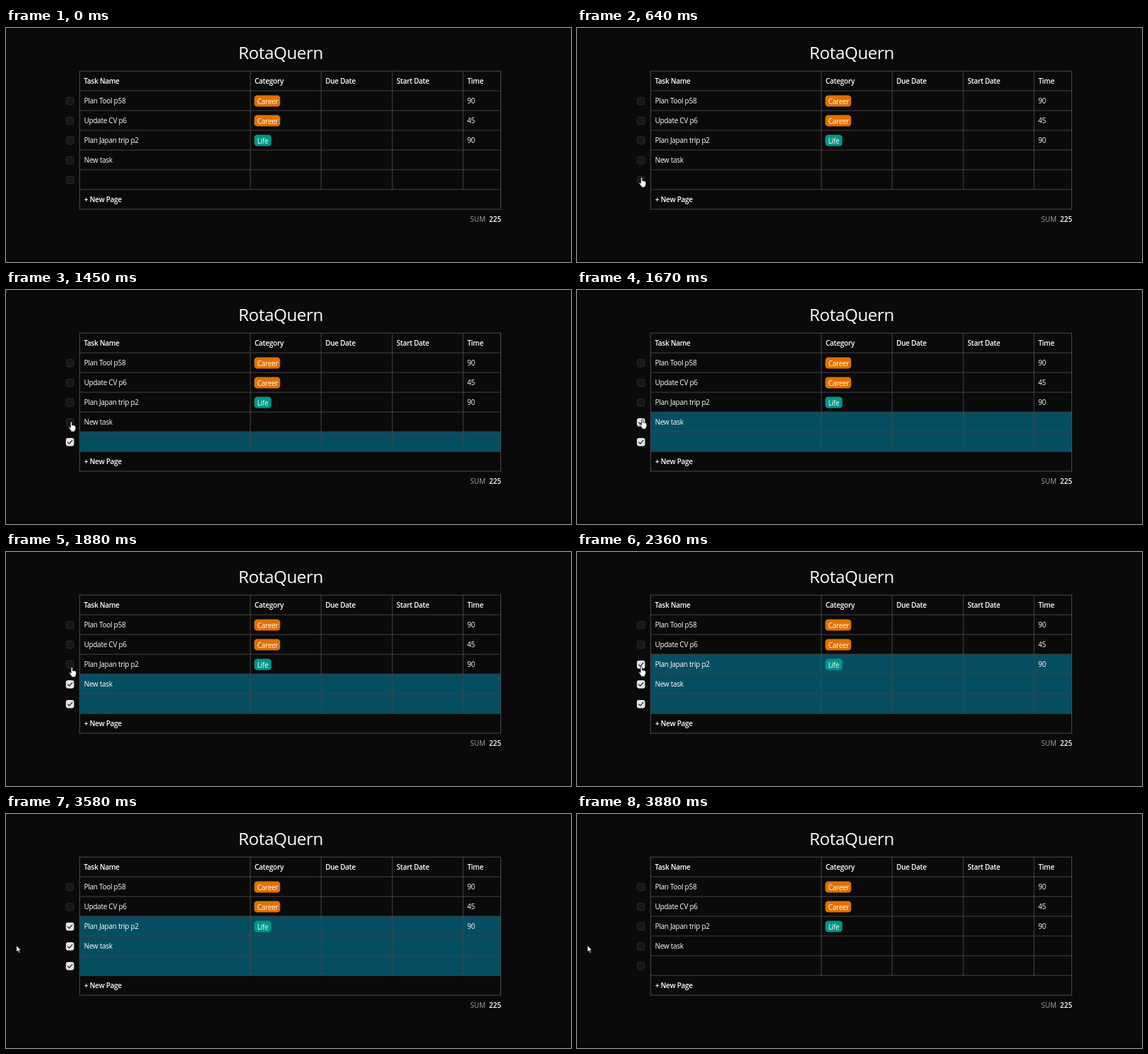
Animation of 800x332 px, one loop 3.97 s. Source, as an HTML page:

```html
<!DOCTYPE html>
<html lang="en">
<head>
<meta charset="utf-8">
<title>Task table</title>
<style>
  html, body { margin: 0; width: 100%; height: 100%; overflow: hidden; background: #0a0a0a; }
  svg { display: block; width: 800px; height: 332px; font: 10px "Open Sans", sans-serif; letter-spacing: -.27px; }
  text { fill: #fff; }
  .title { font-size: 24.2px; letter-spacing: -.4px; text-anchor: middle; }
  .bold { font-weight: 600; }
  .sum { font-weight: 600; letter-spacing: 0; }
  .muted { font-weight: 500; letter-spacing: 0; fill: #a0a0a0; }
</style>
</head>
<body>
<svg id="stage" viewBox="0 0 800 332"></svg>
<script>
const LOOP = 3970, FADE = 150, CLEAR = 3600;
const stage = document.getElementById("stage");
const COLS = [104.2, 346, 446.2, 547, 647.2, 700.5];
const HEADS = ["Task Name", "Category", "Due Date", "Start Date", "Time"];
const ROWS = [
  { name: "Plan Tool p58", tag: "Career", time: "90" },
  { name: "Update CV p6", tag: "Career", time: "45" },
  { name: "Plan Japan trip p2", tag: "Life", time: "90", check: 2000 },
  { name: "New task", check: 1490 },
  { name: "", check: 860 }
];
const TAGS = { Career: [36.7, "#e17100"], Life: [24.2, "#009689"] };

// time, x, y, easing into this point
const PATH = [
  [30, 30, 208, "linear"], [300, 92, 198, "out"], [450, 92, 198, "linear"],
  [640, 91.5, 212, "inOut"], [900, 91.5, 212, "linear"], [1180, 92.5, 187, "inOut"],
  [1600, 92.5, 187, "linear"], [1880, 93.3, 163.5, "inOut"], [2250, 93, 163, "linear"],
  [2520, 82, 162, "in"], [2640, 53.7, 162, "linear"], [3060, 14.8, 186.5, "out"]
];
const EASE = {
  linear: p => p,
  in: p => p * p,
  out: p => 1 - (1 - p) ** 2,
  inOut: p => p * p * (3 - 2 * p)
};

function add(tag, attrs, parent = stage) {
  const el = document.createElementNS("http://www.w3.org/2000/svg", tag);
  for (const key in attrs) el.setAttribute(key, attrs[key]);
  return parent.appendChild(el);
}
function label(text, x, y, cls = "") {
  add("text", { x, y, class: cls }).textContent = text;
}
function rect(x, y, width, height, fill, more = {}, parent = stage) {
  return add("rect", { x, y, width, height, fill, ...more }, parent);
}
const rowTop = i => 89.1 + 28 * i;

rect(0, 0, 800, 1, "#050505");
rect(0, 328, 800, 4, "#060606");
label("RotaQuern", 389, 44.3, "title");

ROWS.forEach((row, i) => {
  row.fill = rect(104.2, rowTop(i), 596.3, 28, "#054e62", { opacity: 0 });
});

let grid = "";
for (let i = 0; i < 6; i++) grid += `M104.2 ${rowTop(i)}H700.5`;
COLS.slice(1, -1).forEach(x => grid += `M${x} 61.1V229.1`);
add("path", { d: grid, stroke: "#444", fill: "none" });
rect(104.2, 61.1, 596.3, 196, "none", { stroke: "#4c4c4c" });

HEADS.forEach((head, i) => label(head, COLS[i] + 6, 79.4, "bold"));
ROWS.forEach((row, i) => {
  const y = rowTop(i);
  label(row.name, 110.4, y + 18.3);
  if (row.tag) {
    const [width, color] = TAGS[row.tag];
    rect(351.5, y + 6.5, width, 16, color, { rx: 4.2 });
    label(row.tag, 355.7, y + 18.8);
    label(row.time, 653, y + 18.3);
  }
  rect(85.3, y + 9.3, 10.5, 10.5, "#171717", { rx: 2.8, stroke: "#2c2c2c" });
  row.mark = add("g", { visibility: "hidden" });
  rect(84.8, y + 8.8, 11.5, 11.5, "#e5e5e5", { rx: 2.8 }, row.mark);
  add("path", {
    d: `M87.4 ${y + 14.7}l2.2 2.3 4.2-4.8`, fill: "none", stroke: "#171717",
    "stroke-width": 1.1, "stroke-linecap": "round", "stroke-linejoin": "round"
  }, row.mark);
});
label("+ New Page", 110.8, 247.4, "bold");
label("SUM", 657.3, 275.2, "muted");
label("225", 684, 275.2, "sum");

const outline = { fill: "#fff", stroke: "#000", "stroke-width": 0.7, "stroke-linejoin": "round" };
const arrow = add("path", { d: "M0 0V9.2L2.1 7.3 3.7 10.9 5.3 10.2 3.7 6.8H6.5Z", ...outline });
const hand = add("path", {
  d: "M-1.2 .8Q0-.7 1.1.8V5Q2.2 4.2 3 5.2 4.1 4.6 4.7 5.7 5.9 5.3 6.1 6.7V9.6" +
     "Q5.9 11.3 5 12.3V13.9H-.5V12.6Q-2.2 10.8-3.6 8.2-3.8 6.6-2.4 7.2L-1.2 8.5Z",
  ...outline
});

function cursorAt(t) {
  const next = PATH.findIndex(p => p[0] > t);
  if (next === 0) return null;
  if (next < 0) return PATH[PATH.length - 1].slice(1, 3);
  const [t0, x0, y0] = PATH[next - 1], [t1, x1, y1, ease] = PATH[next];
  const k = EASE[ease]((t - t0) / (t1 - t0));
  return [x0 + (x1 - x0) * k, y0 + (y1 - y0) * k];
}
const ramp = (t, start) => EASE.inOut(Math.min(1, Math.max(0, (t - start) / FADE)));
const show = (el, on) => el.setAttribute("visibility", on ? "visible" : "hidden");

function draw(t) {
  for (const row of ROWS) {
    if (!row.check) continue;
    row.fill.setAttribute("opacity", ramp(t, row.check) - ramp(t, CLEAR));
    show(row.mark, t >= row.check && t < CLEAR);
  }
  const pos = cursorAt(t);
  let over = false;
  if (pos) {
    const [x, y] = pos, dy = (y - 97.5) % 28;
    over = x > 85 && x < 97 && dy >= 0 && dy <= 12;
    for (const el of [arrow, hand]) el.setAttribute("transform", `translate(${x} ${y})`);
  }
  show(arrow, pos && !over);
  show(hand, over);
}

const start = performance.now();
function tick() {
  draw((performance.now() - start) % LOOP);
  requestAnimationFrame(tick);
}
tick();
</script>
</body>
</html>
```
